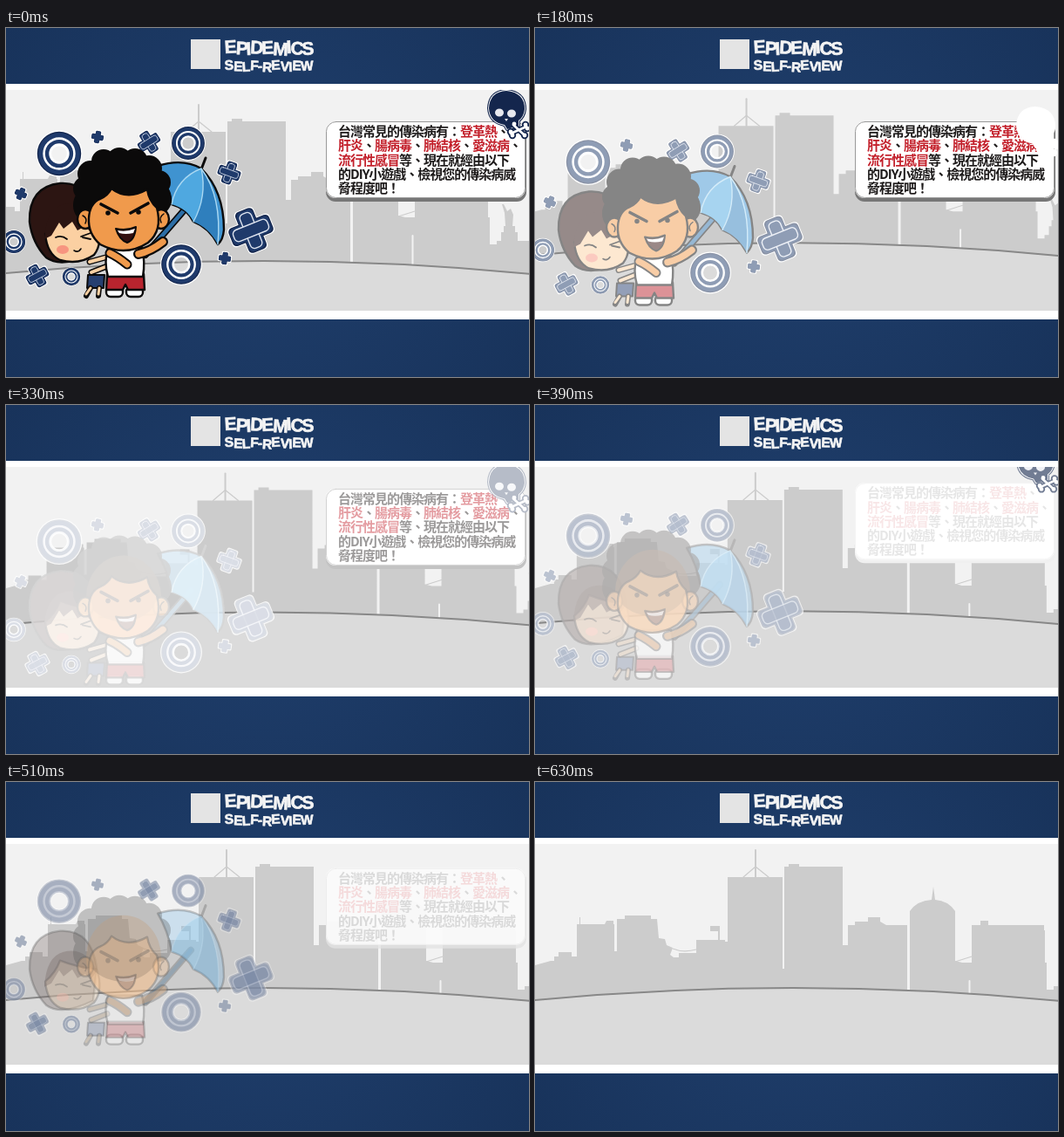
Write an HTML page with a canvas that moves like this. It is 600x400 px and loops after 660 ms.

```html
<!DOCTYPE html>
<html lang="zh-Hant">
<head>
<meta charset="utf-8">
<style>
  html, body { margin: 0; width: 100%; height: 100%; overflow: hidden; background: #1a365f; }
  canvas { display: block; width: 600px; height: 400px; }
</style>
</head>
<body>
<canvas id="stage" width="600" height="400"></canvas>
<script>
const c = document.getElementById('stage').getContext('2d');
const LOOP = 660, STEP = 30;
const NAVY = '#1f3a6b', DEEP = '#14264d', INK = '#0b0a0a', WHITE = '#ffffff', RED = '#c3202b';
const SKIN = '#f09a4c', PEACH = '#fbd0a2';

let tint = 0; // 0 = own colours, 1 = pure white

const clamp = v => Math.min(1, Math.max(0, v));
const part = (t, a, b) => clamp((t - a) / (b - a));
const lerp = (a, b, k) => a + (b - a) * k;

function shade(hex) {
  const n = parseInt(hex.slice(1), 16);
  const ch = s => Math.round(lerp(n >> s & 255, 255, tint));
  return `rgb(${ch(16)},${ch(8)},${ch(0)})`;
}
const toPath = p => typeof p === 'string' ? new Path2D(p) : p;
function fill(p, color, rule = 'nonzero') {
  c.fillStyle = shade(color);
  c.fill(toPath(p), rule);
}
function line(p, color = INK, width = 2) {
  c.strokeStyle = shade(color);
  c.lineWidth = width;
  c.stroke(toPath(p));
}
function shape(p, color, width = 2.4) {
  p = toPath(p);
  fill(p, color);
  line(p, INK, width);
}
function blob(...ellipses) {
  const p = new Path2D();
  for (const [x, y, rx, ry = rx] of ellipses) {
    p.moveTo(x + rx, y);
    p.ellipse(x, y, rx, ry, 0, 0, 7);
  }
  return p;
}
function box(x, y, w, h, r) {
  const p = new Path2D();
  p.roundRect(x, y, w, h, r);
  return p;
}
// Draws with an offset, a tint and an opacity of its own.
function layer(dy, white, alpha, draw) {
  if (alpha <= 0) return;
  c.save();
  c.translate(0, dy);
  tint = white;
  c.globalAlpha = alpha;
  draw();
  c.restore();
  tint = 0;
}

/* ---- scenery ---- */

const city = new Path2D('M-10 300V212L0 210 18 205H22V200H27V195H42V200H48V163H51V155H52V163H80' +
  'L82 159H90V163H91V194H94V157H103V153H133V157H140L142 179 149 180 151 187 158 190 155 198 159 201' +
  'H165V196H185V181H210V171H201V165H212V181H218V183H221V109H284V214H286' +
  'V97H291V94H303V97H353V187H359V164H367V160H382V155H396V160L403 164H427V300H430V148' +
  'Q438 136 455 135L457 120 459 135Q474 136 482 148V205L490 207H501V164H511V159H520V164H584V170H585V207' +
  'H587V238H595V234H600V224H603V217H605L604 202 601 192H603L607 200 611 197 614 204 613 217H616V224H619V234H640V300Z');
const ground = new Path2D('M-2 250.2Q300 221.5 602 251V420H-2Z');
const horizon = new Path2D('M-2 250.2Q300 221.5 602 251');

function scenery(t) {
  const k = (1 - part(t, 0, 420)) ** 2;
  fill(box(0, 71, 600, 253, 0), '#f2f2f2');
  c.save();
  c.translate(-32 * k, 10 * k);
  fill(city, '#cccccc');
  line('M253 78V109', '#cccccc', 2);
  line('M239 109L253 97 268 109M158 191Q170 196 185 192M482 206L501 200', '#cccccc', 1.2);
  line('M498.5 228V262', '#f2f2f2', 2);
  c.restore();
  c.save();
  c.translate(0, 31 * k);
  fill(ground, '#dbdbdb');
  line(horizon, '#888888', 2);
  c.restore();
}

/* ---- hero group ---- */

function ring(x, y, r) {
  const band = (a, b, color) => fill(blob([x, y, r * a], [x, y, r * b]), color, 'evenodd');
  band(1.02, .36, WHITE);
  band(.97, .38, DEEP);
  band(.92, .4, NAVY);
  band(.72, .62, WHITE);
  band(.45, .34, WHITE);
}
function plus(x, y, r, deg) {
  c.save();
  c.translate(x, y);
  c.rotate(deg * Math.PI / 180);
  const bars = d => {
    const a = r - d, b = r * .44 - d, round = r * .2;
    return [box(-b, -a, 2 * b, 2 * a, round), box(-a, -b, 2 * a, 2 * b, round)];
  };
  const cross = (d, color) => {
    const [p, q] = bars(d);
    p.addPath(q);
    fill(p, color);
  };
  cross(-1, WHITE);
  cross(0, DEEP);
  cross(r * .05, NAVY);
  if (r > 8) bars(r * .16).forEach(p => {
    fill(p, NAVY);
    line(p, '#dfe5f0', r * .055);
  });
  c.restore();
}
const rings = [[61, 144, 26], [209, 132, 19.5], [9, 245, 13.5], [201, 271, 23.5], [75, 285, 10.5]];
const pluses = [[164, 131, 13, -32], [105, 125, 7, 12], [17, 190, 7, 25], [256, 166, 13, 20],
  [281, 232, 25, -22], [36, 284, 13, -28], [251, 264, 7, 8]];

function umbrella() {
  line('M224 162L229 149', INK, 3);
  line('M212 200L160 260', INK, 8);
  line('M212 200L160 260', '#2c6ea6', 4.5);
  shape('M174 158Q203 149 224 161Q250 187 250 231Q249 243 243 248Q233 229 215 222Q208 207 190 202Q186 178 174 158Z', '#3f93d0');
  fill('M224 161Q196 172 190 202Q208 207 215 222Q231 193 224 161Z', '#4fa8e0');
  fill('M224 161Q231 193 215 222Q233 229 243 248Q248 198 224 161Z', '#2f7fbd');
  line('M224 161Q196 172 190 202M224 161Q231 193 215 222M224 161Q248 193 243 248', '#a9d8f2', 1.4);
}
function girl() {
  shape('M94 283H113L112 298H93Z', '#263f70', 2);
  line('M97 298L92 307M107 298L106 307', INK, 6);
  line('M97 298L92 305M107 298L106 305', PEACH, 3);
  shape('M27 222Q26 182 62 178Q98 176 104 220L100 258Q64 276 46 263Q30 246 27 222Z', '#2c1512');
  shape('M45 236Q57 226 62 212Q82 220 104 222Q112 246 101 260Q84 272 62 266Q47 259 45 236Z', PEACH);
  fill('M44 242Q46 207 66 202Q92 196 104 224L97 234 91 227 82 232 76 222 66 230 61 223 52 238Z', '#2c1512');
  fill(blob([65, 254, 7, 5]), '#f79580');
  line('M57 240Q64 237 70 242M86 239L97 235M88 240L97 242', INK, 1.8);
  line('M78 255Q83 258 86 253', INK, 1.5);
  line('M96 268L114 263M98 280L116 273', INK, 7);
  line('M96 268L114 263M98 280L116 273', PEACH, 4);
}
function boy() {
  for (const x of [115, 138]) shape(box(x, 297, 19, 11, 5), WHITE);
  shape('M116 282H158L159 300H140L137 294 134 300H115Z', '#b8242e');
  shape('M117 252H156Q160 268 157 285H117Q112 268 117 252Z', WHITE);
  line('M152 259Q166 256 180 245', INK, 12);
  line('M152 259Q166 256 180 245', SKIN, 7.5);
  line('M119 258Q128 262 139 271', INK, 11);
  line('M119 258Q128 262 139 271', SKIN, 7);
  fill(blob([135, 208, 43, 48]), SKIN);
  fill(blob([133, 192, 46, 44], [91, 184, 14], [91, 203, 14, 18], [97, 167, 15], [112, 153, 14],
    [130, 150, 14, 13], [148, 151, 14, 13], [164, 161, 15], [175, 177, 14], [177, 196, 13, 17]), INK);
  for (const x of [91, 178]) shape(blob([x, 219, 9, 11]), SKIN);
  shape('M95 218Q96 201 108 196Q117 192 121 184Q139 198 162 185Q164 198 173 206Q180 232 163 246Q137 263 108 248Q94 236 95 218Z', SKIN);
  line('M88 215Q94 218 91 224M181 213Q175 217 178 223', INK, 1.5);
  line('M109 202L128 212M143 212L163 201', INK, 3.6);
  fill(blob([117, 212, 2.8], [152, 211, 2.8]), INK);
  shape('M126 230Q138 233 149 228Q148 243 139 246Q130 243 126 230Z', '#35100f', 2);
  fill('M128 232Q138 234 148 230L146 235Q137 237 130 235Z', WHITE);
}
function hero(t) {
  const go = part(t, 90, 270), out = part(t, 270, 630);
  layer(t < 270 ? 19 * go : lerp(19, -20.5, out), t < 270 ? go : 1 - out, 1 - out, () => {
    rings.forEach(r => ring(...r));
    pluses.forEach(p => plus(...p));
    umbrella();
    girl();
    boy();
  });
}

/* ---- text panel and skull ---- */

// Words between asterisks are red.
const copy = ['台灣常見的傳染病有：*登革熱*、', '*肝炎*、*腸病毒*、*肺結核*、*愛滋病*、',
  '*流行性感冒*等、現在就經由以下', '的DIY小遊戲、檢視您的傳染病威', '脅程度吧！'];

function panel(t) {
  const go = part(t, 230, 410), out = part(t, 410, 630), fade = 1 - out ** 2;
  layer(t < 410 ? -20 * go : lerp(-20, 6, out), t < 410 ? go : fade, fade, () => {
    fill(box(367, 109, 230, 90, 11), '#777777');
    fill(box(367, 107, 229, 88, 11), WHITE);
    line(box(367.5, 107.5, 228, 87, 11), '#9a9a9a', 1);
    c.font = '900 15px "Noto Sans CJK TC", "Noto Sans CJK", sans-serif';
    c.letterSpacing = '-1px';
    c.textBaseline = 'middle';
    copy.forEach((row, i) => {
      let x = 381;
      row.split('*').forEach((run, j) => {
        c.fillStyle = shade(j % 2 ? RED : '#1d1a1a');
        c.fillText(run, x, 118.5 + 16.2 * i);
        x += c.measureText(run).width;
      });
    });
  });
}
function skull(t) {
  const go = 1 - (1 - part(t, 0, 180)) ** 2, out = part(t, 180, 450) ** 2;
  layer(t < 180 ? 20 * go : lerp(20, -57, out), t < 180 ? go : 1 - out, t < 450 ? 1 : 0, () => {
    const bones = 'M579 121L597 113M582 111L595 123';
    const knobs = r => blob([579, 119, r], [581, 123, r], [596, 111, r], [598, 115, r], [583, 110, r], [595, 123, r]);
    const head = new Path2D('M554 92Q555 73 574 72Q595 74 595 93Q594 102 588 106L588 112 575 116 572 111Q555 108 554 92Z');
    line(head, DEEP, 4);
    line(head, WHITE, 1.8);
    fill(head, DEEP);
    fill(blob([566, 97, 5, 4.5], [580, 98, 5, 4.5]), '#e6e8ee');
    fill('M572 104L576 104 574 107Z', '#e6e8ee');
    fill(knobs(4.2), DEEP);
    line(bones, DEEP, 6);
    fill(knobs(2.4), WHITE);
    line(bones, WHITE, 2.6);
  });
}

/* ---- frame and heading ---- */

function wobbly(text, x, y, size, gap) {
  c.font = `bold ${size}px "Liberation Sans", Arial, sans-serif`;
  c.letterSpacing = '0px';
  c.textBaseline = 'alphabetic';
  c.fillStyle = c.strokeStyle = '#f4f4f4';
  c.lineWidth = .7;
  [...text].forEach((ch, i) => {
    c.save();
    c.translate(x, y + (i % 3 - 1));
    c.rotate((i % 2 ? 1 : -1) * .05);
    c.fillText(ch, 0, 0);
    c.strokeText(ch, 0, 0);
    c.restore();
    x += c.measureText(ch).width + gap;
  });
}
const navy = c.createRadialGradient(300, 200, 120, 300, 200, 360);
navy.addColorStop(0, '#1d3b67');
navy.addColorStop(1, '#18335b');

function frame() {
  c.fillStyle = navy;
  c.fillRect(0, 0, 600, 400);
  c.fillStyle = WHITE;
  c.fillRect(0, 64, 600, 270);
  c.fillStyle = '#e4e4e4';
  c.fillRect(212, 13, 34, 34);
  wobbly('EPIDEMICS', 251, 30, 21, -1.6);
  wobbly('SELF-REVIEW', 251, 49, 15.5, -.4);
}

function draw(t) {
  frame();
  c.save();
  c.beginPath();
  c.rect(0, 71, 600, 253);
  c.clip();
  scenery(t);
  hero(t);
  panel(t);
  skull(t);
  c.restore();
}

c.lineCap = c.lineJoin = 'round';
const start = performance.now();
function tick(now) {
  const t = Math.max(0, now - start) % LOOP;
  draw(Math.floor(t / STEP) * STEP);
  requestAnimationFrame(tick);
}
tick(start);
</script>
</body>
</html>
```
